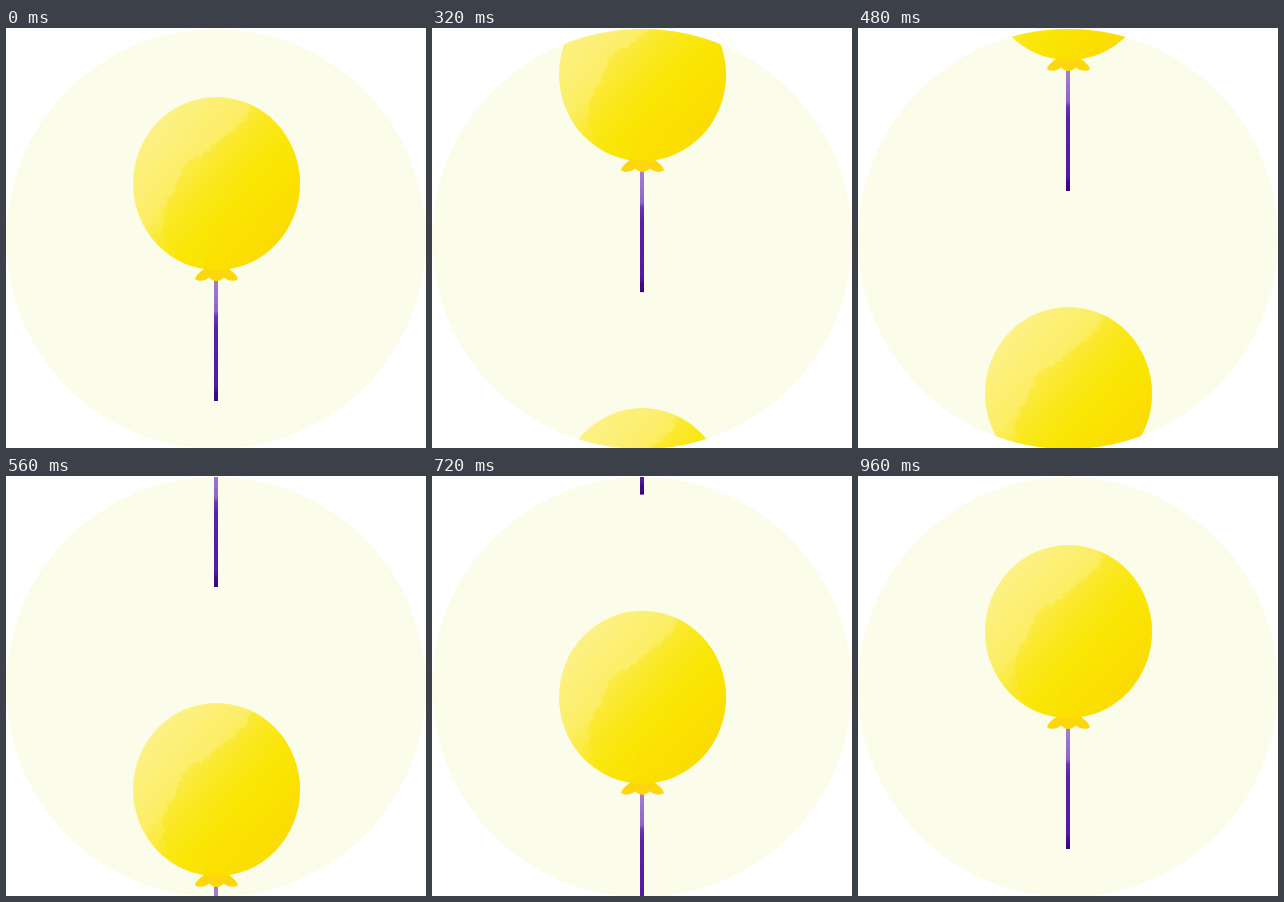
Animation, 420 px wide and 420 px high, one loop 1 s. Source, as an HTML page:

```html
<!DOCTYPE html>
<html lang="en">
<head>
<meta charset="utf-8">
<title>Rising balloon</title>
<style>
  html, body { margin: 0; width: 100%; height: 100%; overflow: hidden; background: #fff; }
  svg { display: block; width: 100%; height: 100%; }
</style>
</head>
<body>
<svg viewBox="0 0 420 420">
  <defs>
    <clipPath id="disc"><circle cx="210" cy="211" r="210"/></clipPath>
    <clipPath id="skin"><ellipse cx="210.5" cy="155.5" rx="83.5" ry="86.5"/></clipPath>
    <linearGradient id="paint" gradientUnits="userSpaceOnUse" x1="140" y1="110" x2="270" y2="225">
      <stop offset="0" stop-color="#fdf185"/>
      <stop offset=".3" stop-color="#fcee66"/>
      <stop offset=".46" stop-color="#fbe92c"/>
      <stop offset=".62" stop-color="#fae608"/>
      <stop offset=".8" stop-color="#fbe000"/>
      <stop offset="1" stop-color="#fdd408"/>
    </linearGradient>
    <linearGradient id="cord" gradientUnits="userSpaceOnUse" x1="0" y1="252" x2="0" y2="373">
      <stop offset="0" stop-color="#a57fd2"/>
      <stop offset=".26" stop-color="#9163c6"/>
      <stop offset=".3" stop-color="#6a34b2"/>
      <stop offset=".4" stop-color="#5a22a8"/>
      <stop offset=".88" stop-color="#5319a2"/>
      <stop offset=".93" stop-color="#3d0b85"/>
      <stop offset="1" stop-color="#360878"/>
    </linearGradient>
    <filter id="rough" color-interpolation-filters="sRGB">
      <feTurbulence type="fractalNoise" baseFrequency=".07" numOctaves="3" seed="4"/>
      <feDisplacementMap in="SourceGraphic" scale="16" xChannelSelector="R" yChannelSelector="G"/>
      <feGaussianBlur stdDeviation=".6"/>
    </filter>
    <g id="balloon">
      <rect x="208" y="250" width="4" height="123" fill="url(#cord)"/>
      <path fill="#fdd60d" d="M204 238 C196 241 190 247 189 251 C192 254 199 253 203 249.500 C205 251 207 253 210.500 253 C214 253 216 251 218 249.500 C222 253 229 254 232 251 C231 247 225 241 217 238Z"/>
      <g clip-path="url(#skin)">
        <rect x="120" y="60" width="180" height="190" fill="url(#paint)"/>
        <g filter="url(#rough)">
          <path fill="#fae500" opacity=".35" d="M249 56 L240 94 L206 118 L180 140 L164 165 L155 195 L163 215 L183 255 H310 V56Z"/>
          <path fill="#fdd60a" opacity=".18" d="M310 135 L270 160 L248 185 L215 202 L185 255 H310Z"/>
        </g>
      </g>
    </g>
  </defs>
  <circle cx="210" cy="211" r="210" fill="#fbfdea"/>
  <g clip-path="url(#disc)">
    <g id="lift">
      <use href="#balloon"/>
      <use href="#balloon" y="420"/>
    </g>
  </g>
</svg>
<script>
  const LOOP = 1000, STEP = 40, LAST = 24, TRAVEL = 420;
  const lift = document.getElementById('lift');
  const smooth = p => p * p * (3 - 2 * p);
  const start = performance.now();

  function draw() {
    const t = (performance.now() - start) % LOOP;
    const p = Math.floor(t / STEP) / LAST;
    lift.setAttribute('transform', `translate(0 ${-TRAVEL * smooth(p)})`);
    requestAnimationFrame(draw);
  }
  draw();
</script>
</body>
</html>
```
